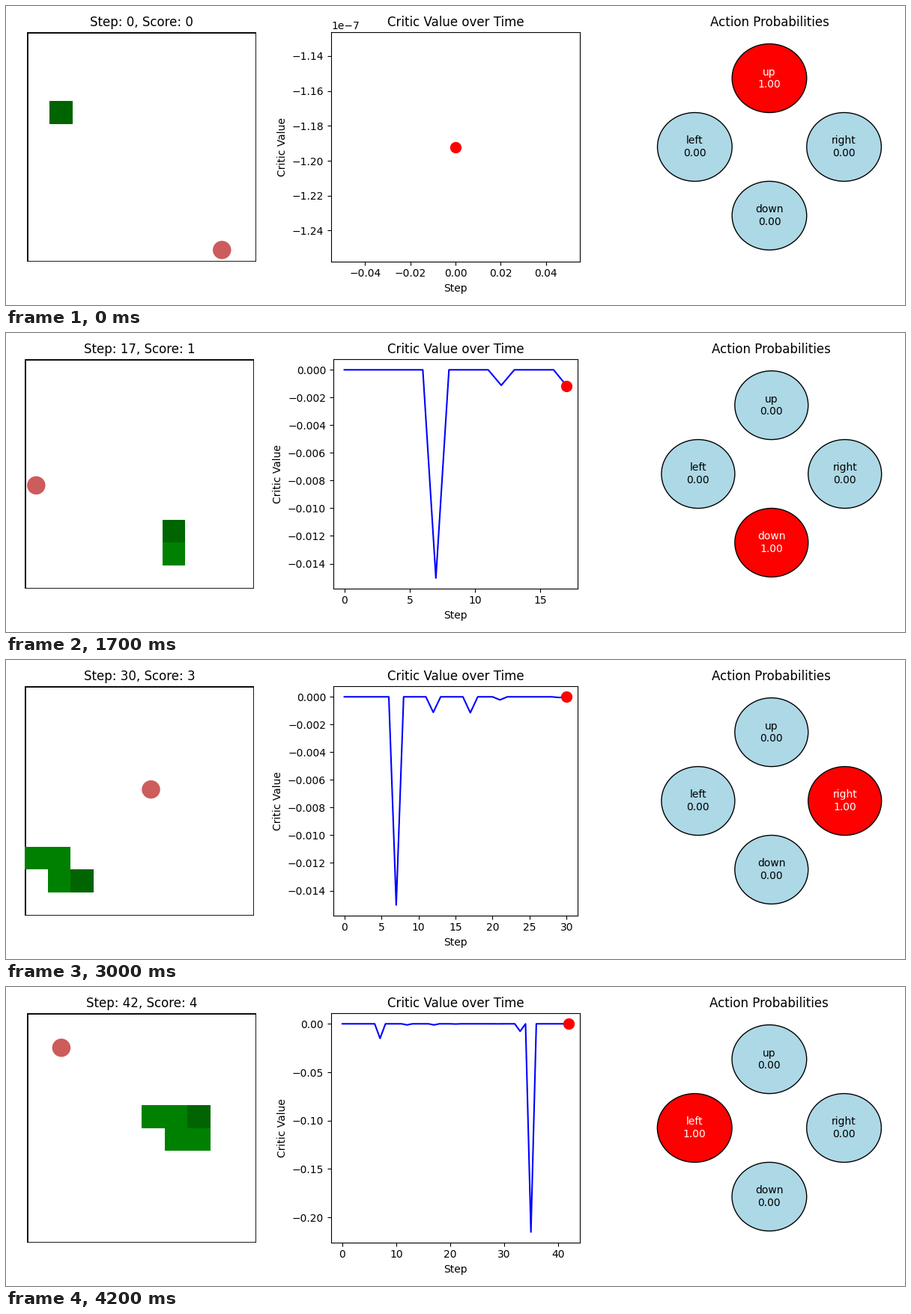
Write a matplotlib script that moves like this. It is 1200 px wide and 400 px high and loops after 7.3 s.

```python
import numpy as np
import matplotlib.pyplot as plt
from matplotlib.animation import FuncAnimation
from matplotlib.colors import to_rgb
from matplotlib.patches import Circle, Rectangle

FRAMES, INTERVAL = 73, 100
SIZE = 10
# Top edge of the axes: outer pad, title height and title gap in pixels.
TOP = 1 - (15 + 12 + 6 / 72 * 100) / 400
START = (1, 3)
# One letter per step; the last move ends the game, so the snake stays put.
MOVES = "URURURURURRUR" "DLLDLLLDLLDL" "UURUR" "RDDRRDD" "RURDL"
DIRS = {"U": (0, 1), "D": (0, -1), "L": (-1, 0), "R": (1, 0)}
FOODS = [(8, 9), (0, 5), (2, 8), (5, 4), (1, 1)]
LAST = len(MOVES)

# Action probabilities are certain except at these steps.
UNSURE = {7: {"U": 0.99, "R": 0.01}, 35: {"R": 0.81, "D": 0.19}}
DIPS = {7: -0.01504, 12: -0.00112, 17: -0.00115, 21: -0.00022,
        29: -0.00005, 33: -0.0077, 35: -0.2151}
ACTIONS = {"U": ("up", 0.5, 0.8), "D": ("down", 0.5, 0.2),
           "L": ("left", 0.2, 0.5), "R": ("right", 0.8, 0.5)}

critic = np.full(LAST + 1, -(2.0 ** -23))
for step, value in DIPS.items():
    critic[step] = value


def play():
    """Return the head's path and the score at every step."""
    path, scores = [START], [0]
    for move in MOVES[:-1]:
        (x, y), (dx, dy) = path[-1], DIRS[move]
        path.append((x + dx, y + dy))
        scores.append(scores[-1] + (path[-1] == FOODS[scores[-1]]))
    return path + path[-1:], scores + scores[-1:]


path, scores = play()
low, high = np.array(to_rgb("lightblue")), np.array(to_rgb("red"))

fig, (board, chart, pad) = plt.subplots(1, 3, figsize=(12, 4), dpi=100)

board.set(xlim=(0, SIZE), ylim=(SIZE, 0), aspect="equal")
board.axis("off")
board.add_patch(Rectangle((0, 0), SIZE, SIZE, fill=False, ec="black", lw=2))
cells = [board.add_patch(Rectangle((0, 0), 1, 1, lw=0,
                                   fc="green" if i else "darkgreen"))
         for i in range(len(FOODS))]
food = board.add_patch(Circle((0, 0), 0.4, fc="indianred", lw=0))

line, = chart.plot([], [], "b-")
dot, = chart.plot([], [], "ro", markersize=10)
chart.set(title="Critic Value over Time", xlabel="Step",
          ylabel="Critic Value")

pad.set(xlim=(0, 1), ylim=(0, 1), title="Action Probabilities")
pad.axis("off")
buttons = {}
for key, (name, x, y) in ACTIONS.items():
    disc = pad.add_patch(Circle((x, y), 0.15, ec="black", lw=1))
    buttons[key] = disc, pad.text(x, y, "", ha="center", va="center")


def draw_board(step):
    score = scores[step]
    head = min(step, LAST - 1)
    for i, cell in enumerate(cells):
        cell.set_visible(i <= score)
        if i <= score:
            cell.set_xy(path[head - i])
    fx, fy = FOODS[score]
    food.center = fx + 0.5, fy + 0.5
    board.set_title(f"Step: {step}, Score: {score}")


def draw_chart(step):
    line.set_data(np.arange(step + 1), critic[:step + 1])
    dot.set_data([step], [critic[step]])
    chart.relim()
    chart.autoscale_view()


def draw_pad(step):
    move = MOVES[step - 1] if step else "U"
    probs = UNSURE.get(step, {move: 1.0})
    for key, (disc, label) in buttons.items():
        p = probs.get(key, 0.0)
        disc.set_facecolor(low + (high - low) * p)
        label.set_text(f"{ACTIONS[key][0]}\n{p:.2f}")
        label.set_color("white" if p > 0.5 else "black")


def update(frame):
    step = min(frame, LAST)
    draw_board(step)
    draw_chart(step)
    draw_pad(step)
    # Start each layout from the default margins so it never drifts.
    fig.subplots_adjust(left=0.125, right=0.9, bottom=0.11, top=0.88,
                        wspace=0.2, hspace=0.2)
    fig.tight_layout()
    fig.subplots_adjust(top=TOP)
    return []


anim = FuncAnimation(fig, update, frames=FRAMES, interval=INTERVAL,
                     init_func=lambda: update(0), repeat=True,
                     repeat_delay=0, blit=False)
plt.show()
```
